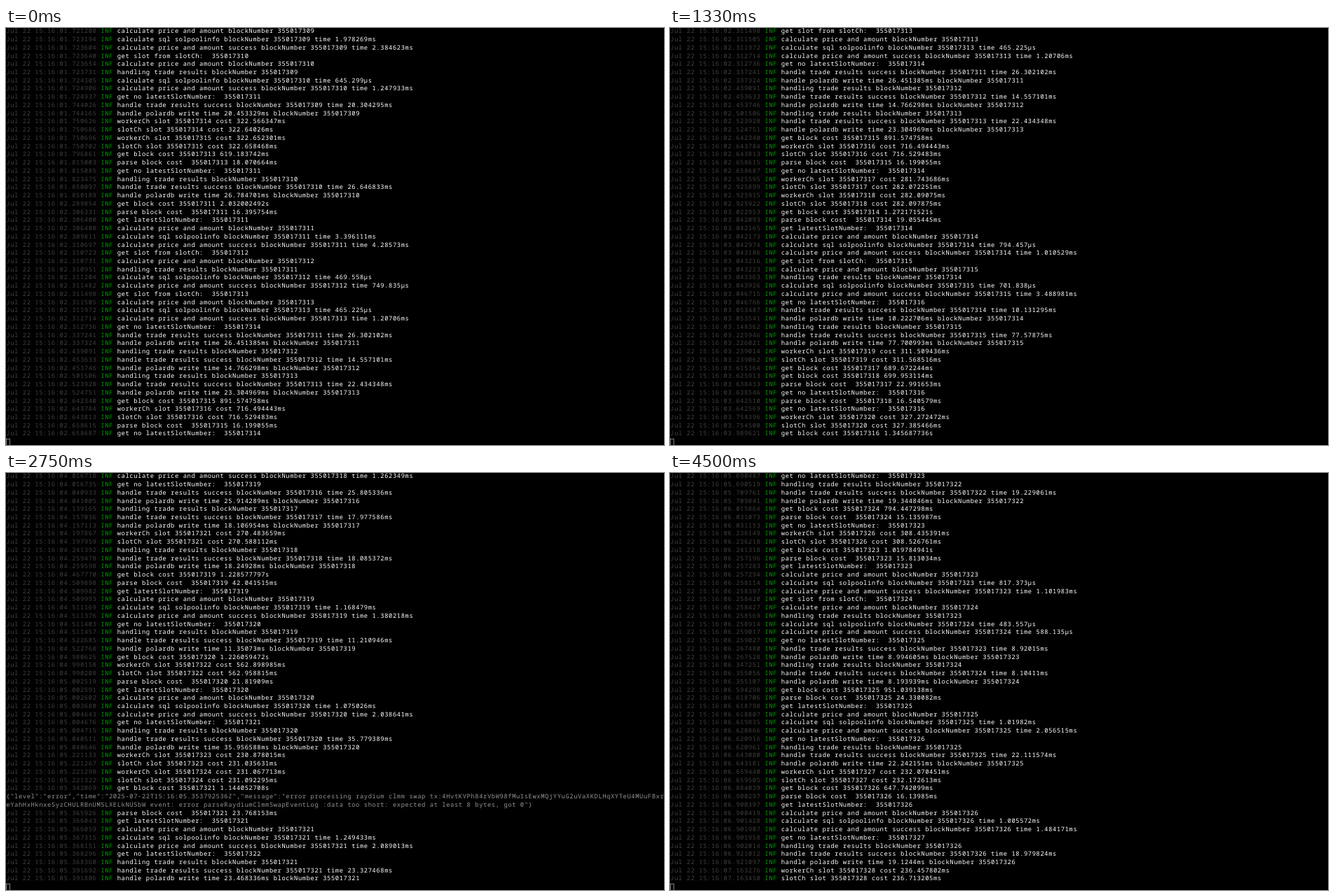
Recreate the animation shown at these times as an HTML page. Size 939x596 px, loop 4.83 s.

```html
<!DOCTYPE html>
<html lang="en">
<head>
<meta charset="utf-8">
<title>Block sync log</title>
<style>
html, body { margin: 0; width: 100%; height: 100%; overflow: hidden; background: #000; }
svg { display: block; width: 939px; height: 596px; }
text {
  font: 12px "Noto Sans Mono", "DejaVu Sans Mono", monospace;
  white-space: pre;
  text-rendering: geometricPrecision;
}
.time { fill: #404040; }
.level { fill: #00a000; }
.msg { fill: #fff; }
.raw { fill: #949494; }
.cursor { fill: none; stroke: #b0b0b0; }
</style>
</head>
<body>
<svg id="term" viewBox="0 0 1280 812.44" preserveAspectRatio="none">
  <svg width="1280" height="800" overflow="hidden"><g id="rows"></g></svg>
  <rect class="cursor" x="0.5" y="800.5" width="7" height="15"/>
</svg>
<script>
const CELL = 8, ROW = 16, BASE = 10, VISIBLE = 50, LOOP = 4830;

// # is the block number, @ the duration
const MESSAGES = {
  price: 'calculate price and amount blockNumber #',
  sql: 'calculate sql solpoolinfo blockNumber # time @',
  done: 'calculate price and amount success blockNumber # time @',
  from: 'get slot from slotCh:  #',
  none: 'get no latestSlotNumber:  #',
  last: 'get latestSlotNumber:  #',
  trade: 'handling trade results blockNumber #',
  ok: 'handle trade results success blockNumber # time @',
  db: 'handle polardb write time @ blockNumber #',
  work: 'workerCh slot # cost @',
  slot: 'slotCh slot # cost @',
  block: 'get block cost # @',
  parse: 'parse block cost  # @'
};

const LOG = `
01.721208 price 309
01.723194 sql 309 1.978269ms
01.723604 done 309 2.384623ms
01.723640 from 310
01.723654 price 310
01.723731 trade 309
01.724305 sql 310 645.299µs
01.724906 done 310 1.247933ms
01.724937 none 311
01.744026 ok 309 20.304295ms
01.744165 db 309 20.453329ms
01.750626 work 314 322.566347ms
01.750686 slot 314 322.64026ms
01.750696 work 315 322.652301ms
01.750702 slot 315 322.658468ms
01.796861 block 313 619.183742ms
01.815003 parse 313 18.070664ms
01.815085 none 311
01.823475 trade 310
01.850097 ok 310 26.646833ms
01.850189 db 310 26.784701ms
02.289854 block 311 2.032002492s
02.306331 parse 311 16.395754ms
02.306400 last 311
02.306408 price 311
02.309811 sql 311 3.396111ms
02.310697 done 311 4.28573ms
02.310723 from 312
02.310731 price 312
02.310951 trade 311
02.311204 sql 312 469.558µs
02.311482 done 312 749.835µs
02.311498 from 313
02.311505 price 313
02.311972 sql 313 465.225µs
02.312714 done 313 1.20706ms
02.312736 none 314
02.337241 ok 311 26.302102ms
02.337324 db 311 26.451385ms
02.439091 trade 312
02.453633 ok 312 14.557101ms
02.453746 db 312 14.766298ms
02.501506 trade 313
02.523928 ok 313 22.434348ms
02.524751 db 313 23.304969ms
02.642340 block 315 891.574758ms
02.643784 work 316 716.494443ms
02.643813 slot 316 716.529483ms
02.658615 parse 315 16.199055ms
02.658687 none 314
02.925595 work 317 281.743686ms
02.925899 slot 317 282.072251ms
02.925915 work 318 282.09075ms
02.925922 slot 318 282.097875ms
03.022953 block 314 1.272171521s
03.042093 parse 314 19.055445ms
03.042165 last 314
03.042173 price 314
03.042974 sql 314 794.457µs
03.043186 done 314 1.010529ms
03.043216 from 315
03.043223 price 315
03.043363 trade 314
03.043926 sql 315 701.838µs
03.046715 done 315 3.488981ms
03.046766 none 316
03.053487 ok 314 10.131295ms
03.053541 db 314 10.222706ms
03.148362 trade 315
03.225946 ok 315 77.57875ms
03.226021 db 315 77.700993ms
03.239014 work 319 311.509436ms
03.239062 slot 319 311.568516ms
03.615364 block 317 689.672244ms
03.625913 block 318 699.953114ms
03.638433 parse 317 22.991653ms
03.638546 none 316
03.642510 parse 318 16.540579ms
03.642569 none 316
03.754396 work 320 327.272472ms
03.754500 slot 320 327.385466ms
03.989621 block 316 1.345687736s
04.012625 parse 316 22.916115ms
04.012711 last 316
04.012721 price 316
04.013778 sql 316 1.050527ms
04.014812 done 316 2.088597ms
04.014842 from 317
04.014850 price 317
04.015134 trade 316
04.015270 sql 317 419.103µs
04.015405 done 317 554.971µs
04.015446 from 318
04.015454 price 318
04.015873 sql 318 417.728µs
04.016718 done 318 1.262349ms
04.016735 none 319
04.040933 ok 316 25.805336ms
04.041005 db 316 25.914289ms
04.139165 trade 317
04.157036 ok 317 17.977586ms
04.157113 db 317 18.106954ms
04.197867 work 321 270.483659ms
04.197959 slot 321 270.588112ms
04.241392 trade 318
04.259478 ok 318 18.085372ms
04.259598 db 318 18.24928ms
04.467770 block 319 1.228577797s
04.509898 parse 319 42.041515ms
04.509982 last 319
04.509993 price 319
04.511169 sql 319 1.168479ms
04.511376 done 319 1.380218ms
04.511403 none 320
04.511457 trade 319
04.522685 ok 319 11.210946ms
04.522768 db 319 11.35073ms
04.980625 block 320 1.226059472s
04.990158 work 322 562.898985ms
04.990208 slot 322 562.958815ms
05.002519 parse 320 21.81909ms
05.002591 last 320
05.002602 price 320
05.003680 sql 320 1.075026ms
05.004643 done 320 2.038641ms
05.004676 none 321
05.004715 trade 320
05.040511 ok 320 35.779389ms
05.040646 db 320 35.956588ms
05.221133 work 323 230.878015ms
05.221267 slot 323 231.035631ms
05.221298 work 324 231.067713ms
05.221322 slot 324 231.092295ms
05.342069 block 321 1.144052708s
{"level":"error","time":"2025-07-22T15:16:05.353792536Z","message":"error processing raydium clmm swap tx:4HvtKVPh84rVbW98fMu1sEwxMQjYYuG2uVaXKDLHqXYTeU4MUuFBxreYahHxHknxeSyzCHULRBnUM5LXELkNU5bW event: error parseRaydiumClmmSwapEventLog :data too short: expected at least 8 bytes, got 0"}
05.365926 parse 321 23.768153ms
05.366043 last 321
05.366059 price 321
05.367315 sql 321 1.249433ms
05.368151 done 321 2.089013ms
05.368296 none 322
05.368360 trade 321
05.391692 ok 321 23.327468ms
05.391806 db 321 23.468336ms
05.642916 work 325 215.406754ms
05.643004 slot 325 215.510832ms
05.664648 block 322 674.367558ms
05.688227 parse 322 23.500751ms
05.688370 last 322
05.688406 price 322
05.689533 sql 322 1.12244ms
05.690462 done 322 2.053433ms
05.690487 none 323
05.690519 trade 322
05.709761 ok 322 19.229061ms
05.709841 db 322 19.344846ms
06.015864 block 324 794.447298ms
06.031073 parse 324 15.135987ms
06.031153 none 323
06.236149 work 326 308.435391ms
06.236218 slot 326 308.526761ms
06.241318 block 323 1.019784941s
06.257196 parse 323 15.813034ms
06.257283 last 323
06.257294 price 323
06.258114 sql 323 817.373µs
06.258397 done 323 1.101983ms
06.258420 from 324
06.258427 price 324
06.258569 trade 323
06.258914 sql 324 483.557µs
06.259017 done 324 588.135µs
06.259027 none 325
06.267480 ok 323 8.92015ms
06.267528 db 323 8.994605ms
06.347251 trade 324
06.355056 ok 324 8.10411ms
06.355107 db 324 8.193939ms
06.594298 block 325 951.039138ms
06.618706 parse 325 24.330082ms
06.618798 last 325
06.618807 price 325
06.619835 sql 325 1.01982ms
06.620866 done 325 2.056515ms
06.620916 none 326
06.620961 trade 325
06.643080 ok 325 22.111574ms
06.643181 db 325 22.242151ms
06.659440 work 327 232.070451ms
06.659505 slot 327 232.172613ms
06.884039 block 326 647.742099ms
06.900297 parse 326 16.13985ms
06.900397 last 326
06.900419 price 326
06.901428 sql 326 1.005572ms
06.901907 done 326 1.484171ms
06.901958 none 327
06.902014 trade 326
06.921012 ok 326 18.979824ms
06.921097 db 326 19.1244ms
07.163276 work 328 236.457802ms
07.163450 slot 328 236.713205ms
`.trim().split('\n');

// [time in ms, rows printed so far]
const STEPS = [
  [0, 50], [420, 54], [500, 68], [670, 73], [1000, 79], [1080, 81],
  [1330, 82], [1420, 99], [1500, 102], [1580, 107], [1830, 108], [1920, 117],
  [2420, 127], [2500, 129], [2580, 133], [2750, 145], [3000, 147], [3080, 157],
  [3330, 160], [3580, 176], [3670, 179], [4000, 191], [4250, 201], [4500, 203]
];

const rows = document.getElementById('rows');
let count = 0;
let gap = 0;

function put(col, cls, str) {
  const el = document.createElementNS('http://www.w3.org/2000/svg', 'text');
  el.setAttribute('x', col * CELL + gap / 2);
  el.setAttribute('y', count * ROW + BASE);
  el.setAttribute('class', cls);
  el.textContent = str;
  rows.append(el);
  return el;
}

// Centre each glyph in its terminal cell
const probe = put(0, 'msg', '0'.repeat(100));
gap = CELL - probe.getComputedTextLength() / 100;
rows.style.letterSpacing = gap + 'px';
probe.remove();

for (const line of LOG) {
  if (line[0] === '{') {
    for (const part of line.match(/.{1,160}/g)) {
      put(0, 'raw', part);
      count++;
    }
    continue;
  }
  const [time, kind, block, cost] = line.split(' ');
  put(0, 'time', 'Jul 22 15:16:' + time);
  put(23, 'level', 'INF');
  put(27, 'msg', MESSAGES[kind].replace('#', '355017' + block).replace('@', cost));
  count++;
}

let shown = 0;
function draw() {
  const t = performance.now() % LOOP;
  const printed = STEPS.findLast(([at]) => at <= t)[1];
  if (printed !== shown) {
    shown = printed;
    rows.setAttribute('transform', `translate(0 ${(VISIBLE - printed) * ROW})`);
  }
  requestAnimationFrame(draw);
}
draw();
</script>
</body>
</html>
```
